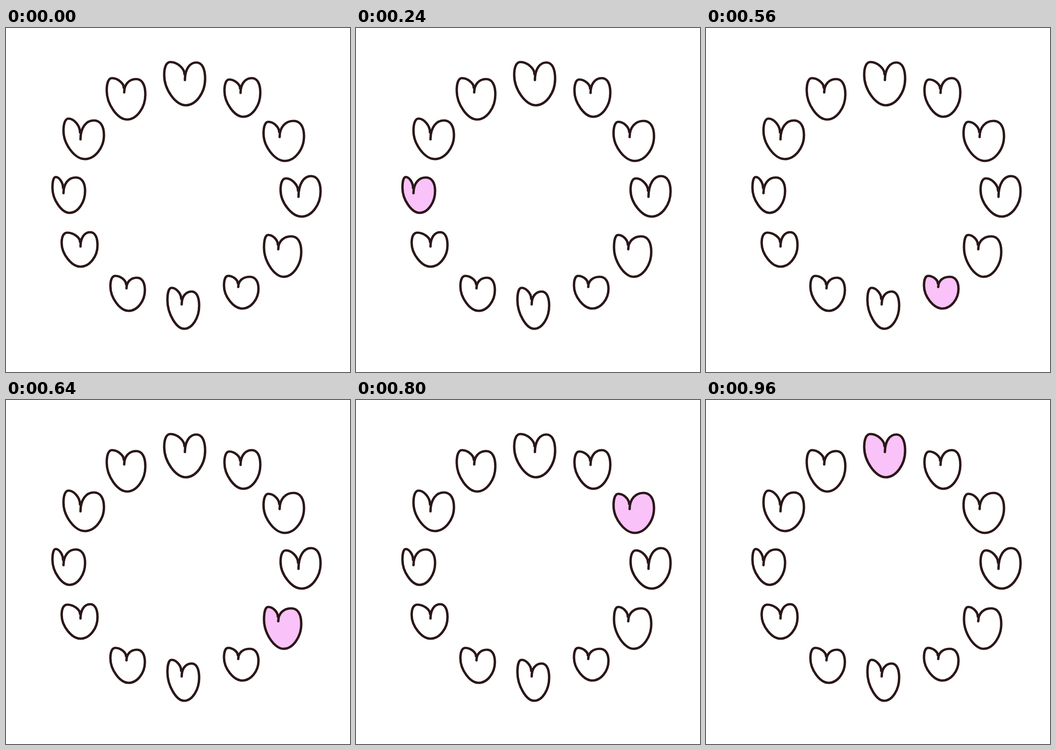
Recreate the animation shown at these times as an HTML page. Size 748x748 px, loop 1.04 s.

```html
<!DOCTYPE html>
<html lang="en">
<head>
<meta charset="utf-8">
<title>Ring of hearts</title>
<style>
  html, body { margin: 0; height: 100%; overflow: hidden; background: #fff; }
  svg { display: block; width: 100%; height: 100%; }
  path { fill: none; stroke: #2b1718; stroke-width: 5.2; stroke-linecap: round; stroke-linejoin: round; }
  path.lit { fill: #f9c2f9; }
</style>
</head>
<body>
<svg id="ring" viewBox="0 0 748 748"></svg>
<script>
const ring = document.getElementById('ring');
const STEP = 80;
const hearts = [];
const mix = (a, b, t) => a + (b - a) * t;

// Rounded corner from a to b; k sets how full it is.
const fromSide = (a, b, k) => `C${a.x} ${mix(a.y, b.y, k)} ${mix(b.x, a.x, k)} ${b.y} ${b.x} ${b.y}`;
const fromTop = (a, b, k) => `C${mix(a.x, b.x, k)} ${a.y} ${b.x} ${mix(b.y, a.y, k)} ${b.x} ${b.y}`;

// One pen stroke: up from the notch, around, and back down to just above it.
function heart(left, right, bottom, leftTop, rightTop, notchX, notchY) {
  const notch = { x: notchX, y: notchY };
  const rightLobe = { x: mix(notchX, right, 0.57), y: rightTop };
  const rightSide = { x: right, y: mix(rightTop, bottom, 0.38) };
  const tip = { x: (left + right) / 2 + 2, y: bottom };
  const leftSide = { x: left, y: mix(leftTop, bottom, 0.3) };
  const leftLobe = { x: mix(left, notchX, 0.3), y: leftTop };
  const join = { x: notchX - 1, y: mix(notchY, leftTop, 0.33) };

  const path = document.createElementNS('http://www.w3.org/2000/svg', 'path');
  path.setAttribute('d', `M${notchX} ${notchY}` +
    fromSide(notch, rightLobe, 0.6) +
    fromTop(rightLobe, rightSide, 0.63) +
    fromSide(rightSide, tip, 0.53) +
    fromTop(tip, leftSide, 0.47) +
    fromSide(leftSide, leftLobe, 0.63) +
    fromTop(leftLobe, join, 0.48));
  ring.append(path);
  hearts.push(path);
}

// Counter-clockwise, in the order they light up.
heart(219, 303, 199, 109, 111, 257, 140);
heart(125, 213, 285, 197, 201, 162, 242);
heart(101, 172, 402, 324, 325, 125, 359);
heart(121, 199, 519, 445, 444, 162, 475);
heart(227, 302, 615, 539, 543, 262, 566);
heart(351, 420, 654, 565, 573, 382, 601);
heart(474, 549, 610, 539, 541, 505, 563);
heart(561, 642, 541, 450, 453, 592, 481);
heart(597, 684, 410, 327, 322, 636, 367);
heart(560, 648, 289, 204, 202, 595, 237);
heart(475, 553, 193, 112, 109, 510, 141);
heart(344, 433, 168, 74, 75, 389, 113);

const start = performance.now();
function draw(now) {
  const step = Math.floor(Math.max(0, now - start) / STEP) % (hearts.length + 1);
  hearts.forEach((h, i) => h.classList.toggle('lit', i === step - 1));
  requestAnimationFrame(draw);
}
draw(start);
</script>
</body>
</html>
```
